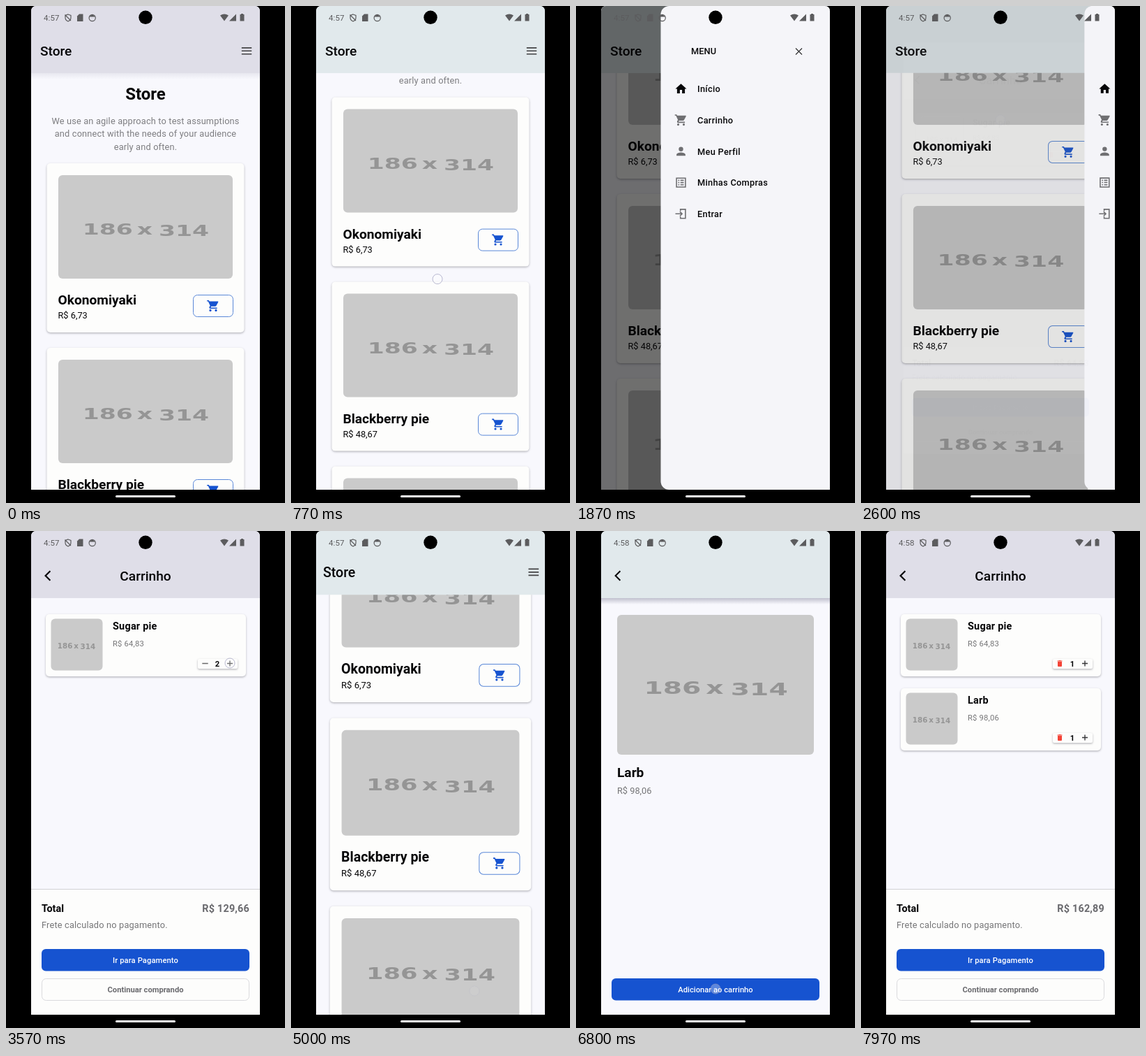
An HTML page with a canvas for the animation above (8 s loop, 400 by 711 pixels).

```html
<!DOCTYPE html>
<html lang="pt">
<head>
<meta charset="utf-8">
<style>
  html, body { margin: 0; width: 100%; height: 100%; overflow: hidden; background: #000; }
  canvas { display: block; width: 400px; height: 711px; }
</style>
</head>
<body>
<canvas id="stage" width="400" height="711"></canvas>
<script>
const ctx = document.getElementById('stage').getContext('2d');
const LOOP = 8000;
const INK = '#060608', GRAY = '#757577', BLUE = '#1653d0';
const BODY = '#f8f8fd', CARD = '#fdfdfc', HEADER = '#dfdee8', HEADER_COOL = '#e1e9ec', IMAGE = '#cacaca';

const ITEMS = [['Okonomiyaki', 'R$ 6,73'], ['Blackberry pie', 'R$ 48,67'], ['Larb', 'R$ 98,06'],
  ['Buko pie', 'R$ 31,40'], ['Sugar pie', 'R$ 64,83']];

const ICONS = {
  cart: 'M1 2v2h2l3.6 7.6-1.4 2.4q-.8 3 1.8 3h12v-2H7.4l1-2h7.2q1.2 0 1.8-1L21 5.500V4H5.200l-.9-2z' +
    'M5 20a2 2 0 1 0 4 0 2 2 0 1 0-4 0M15 20a2 2 0 1 0 4 0 2 2 0 1 0-4 0',
  home: 'M10 20v-6h4v6h5v-8h3L12 3 2 12h3v8z',
  person: 'M8 8a4 4 0 1 0 8 0 4 4 0 1 0-8 0M12 14c-2.700 0-8 1.300-8 4v2h16v-2c0-2.700-5.300-4-8-4z',
  trash: 'M6 7h12v12q0 2-2 2H8q-2 0-2-2zM19 4h-3.500l-1-1h-5l-1 1H5v2h14z'
};
const LINE_ICONS = {
  list: 'M4 4h16v16H4zM7 8h2M11 8h6M7 12h2M11 12h6M7 16h2M11 16h6',
  enter: 'M11 7V4h9v16h-9v-3M2 12h12M10 8l4 4-4 4',
  plus: 'M12 5v14M5 12h14',
  minus: 'M5 12h14',
  close: 'M6 6l12 12M18 6L6 18',
  back: 'M16 4l-8 8 8 8',
  menu: 'M3 6.500h18M3 12h18M3 17.500h18'
};

const clamp = v => Math.min(1, Math.max(0, v));
const span = (t, start, length) => clamp((t - start) / length);
const smooth = (t, start, length) => { const p = span(t, start, length); return p * p * (3 - 2 * p); };
const easeOut = (t, start, length) => 1 - (1 - span(t, start, length)) ** 3;

function text(str, x, y, size, { weight = 400, color = INK, align = 'left', spacing = 0 } = {}) {
  ctx.font = `${weight} ${size}px Roboto, sans-serif`;
  ctx.letterSpacing = spacing + 'px';
  ctx.textAlign = align;
  ctx.fillStyle = color;
  ctx.fillText(str, x, y);
}

function box(x, y, w, h, r, fill, stroke) {
  ctx.beginPath();
  ctx.roundRect(x, y, w, h, r);
  if (fill) { ctx.fillStyle = fill; ctx.fill(); }
  if (stroke) { ctx.strokeStyle = stroke; ctx.lineWidth = 1; ctx.stroke(); }
}

function shadowBox(...args) {
  ctx.save();
  ctx.shadowColor = 'rgba(70,70,80,.4)';
  ctx.shadowBlur = 3;
  ctx.shadowOffsetY = 1.2;
  box(...args);
  ctx.restore();
}

function icon(name, x, y, scale, color, width = 2) {
  ctx.save();
  ctx.translate(x, y);
  ctx.scale(scale, scale);
  ctx.translate(-12, -12);
  if (ICONS[name]) {
    ctx.fillStyle = color;
    ctx.fill(new Path2D(ICONS[name]));
  } else {
    ctx.strokeStyle = color;
    ctx.lineWidth = width;
    ctx.stroke(new Path2D(LINE_ICONS[name]));
  }
  ctx.restore();
}

// Placeholder picture: its caption is distorted along with the picture.
function placeholder(x, y, w, h, size, stretch) {
  box(x, y, w, h, 6, IMAGE);
  ctx.save();
  ctx.translate(x + w / 2 - 1, y + h / 2 + size * .5);
  ctx.scale(stretch, 1);
  ctx.font = `700 ${size}px "DejaVu Sans", sans-serif`;
  ctx.letterSpacing = '0px';
  ctx.fillStyle = '#959595';
  ctx.textAlign = 'right';
  ctx.fillText('186', -size * .5, 0);
  ctx.textAlign = 'center';
  ctx.fillText('x', 0, 0);
  ctx.textAlign = 'left';
  ctx.fillText('314', size * .58, size * .11);
  ctx.restore();
}

function header(color, depth = 0) {
  const shade = ctx.createLinearGradient(0, 96, 0, 105);
  shade.addColorStop(0, `rgba(90,90,120,${depth})`);
  shade.addColorStop(1, 'rgba(90,90,120,0)');
  box(36, 96, 328, 9, 0, shade);
  box(36, 0, 328, 96, 0, color);
}

function store(scroll) {
  box(36, 0, 328, 692, 0, BODY);
  ctx.save();
  ctx.translate(0, -scroll);
  text('Store', 200, 133.5, 24, { weight: 700, align: 'center' });
  ['We use an agile approach to test assumptions', 'and connect with the needs of your audience',
    'early and often.'].forEach((line, i) =>
    text(line, 200, 168.5 + i * 18.6, 12.77, { color: '#7d7d80', align: 'center', spacing: .17 }));
  ITEMS.forEach(([name, price], i) => {
    const y = 225 + i * 264;
    shadowBox(58.5, y, 283, 242, 5, CARD);
    placeholder(75, y + 17, 250, 148, 22, 1.57);
    text(name, 74.5, y + 202, 19.15, { weight: 700 });
    text(price, 74.5, y + 222, 12.77);
    box(268.5, y + 188.5, 57, 31, 6, null, '#5a88d8');
    icon('cart', 297, y + 204, .8, BLUE);
  });
  ctx.restore();
  header(scroll > 1 ? HEADER_COOL : HEADER, scroll > 1 ? 0 : .1);
  text('Store', 49, 71, 19.15, { weight: 500 });
  icon('menu', 345, 64.3, .8, '#444446');
}

function cart(rows, total) {
  box(36, 0, 328, 692, 0, BODY);
  header(HEADER);
  icon('back', 60, 64, .85, INK, 2.6);
  text('Carrinho', 200, 71, 19.15, { weight: 500, align: 'center' });
  rows.forEach(([name, price, count], i) => {
    const y = 119 + i * 106;
    shadowBox(57, y, 287, 89, 5, CARD);
    placeholder(64.5, y + 6.5, 74, 74, 11, .94);
    text(name, 153, y + 22, 14.4, { weight: 700, spacing: .25 });
    text(price, 153, y + 46, 11.2, { color: GRAY, spacing: .2 });
    shadowBox(275, y + 64, 57, 14, 2, CARD);
    if (count > 1) icon('minus', 285.5, y + 70.5, .6, '#68686a', 2.5);
    else icon('trash', 285, y + 70.5, .5, '#f44336');
    text(count, 303, y + 75, 11.2, { weight: 700, align: 'center' });
    icon('plus', 321, y + 70.5, .57, '#363638', 2.4);
  });
  box(36, 512, 328, 180, 0, CARD);
  box(36, 512, 328, 1, 0, '#d2d2d6');
  text('Total', 51, 545, 14.4, { weight: 700 });
  text(total, 349, 545, 14.4, { weight: 700, color: '#6a6a6e', align: 'right', spacing: .2 });
  text('Frete calculado no pagamento.', 51, 568, 12.77, { color: GRAY, spacing: .18 });
  box(51, 598, 298, 31.5, 6, BLUE);
  text('Ir para Pagamento', 200, 618, 11.2, { weight: 500, color: '#fff', align: 'center', spacing: .1 });
  box(51.5, 640.5, 297, 31, 6, null, '#dadade');
  text('Continuar comprando', 200, 660, 11.2, { weight: 700, color: '#6a6a6e', align: 'center' });
}

function product(t) {
  box(36, 0, 328, 692, 0, BODY);
  header(HEADER_COOL, .35);
  icon('back', 60, 64, .85, INK, 2.4);
  if (t < 6050) {
    const head = Math.max(.1, (t - 5580) / 75);
    const length = .25 + 2 * (1 - Math.cos(Math.max(0, t - 5600) / 220));
    ctx.beginPath();
    ctx.arc(200, 394, 14, head - Math.PI / 2, head - Math.PI / 2 + length);
    ctx.strokeStyle = '#77777a';
    ctx.lineWidth = 3;
    ctx.stroke();
    return;
  }
  placeholder(59, 120, 282, 200, 25, 1.57);
  text('Larb', 59, 352, 19.15, { weight: 700 });
  text('R$ 98,06', 59, 376, 12.77, { color: GRAY });
  box(51, 640, 298, 31.5, 6, BLUE);
  text('Adicionar ao carrinho', 200, 660, 11.2, { weight: 500, color: '#fff', align: 'center' });
}

function drawer(open) {
  if (!open) return;
  box(36, 0, 328, 692, 0, `rgba(0,0,0,${.56 * open})`);
  ctx.save();
  ctx.translate(243 * (1 - open), 0);
  box(121.5, 0, 242.5, 692, [12, 0, 0, 12], '#f5f5f9');
  text('MENU', 165, 69.3, 12.77, { weight: 500, spacing: .1 });
  icon('close', 319.5, 65, .75, '#38383a', 1.7);
  [['home', 'Início'], ['cart', 'Carrinho'], ['person', 'Meu Perfil'], ['list', 'Minhas Compras'], ['enter', 'Entrar']]
    .forEach(([name, label], i) => {
      const y = 118.500 + i * 44.7;
      icon(name, 150.5, y, .8, i ? '#6f6f72' : INK);
      text(label, 174, y + 4.8, 12.77, { weight: 500, spacing: .3 });
    });
  ctx.restore();
}

function zoomed(scale, alpha, draw) {
  ctx.save();
  ctx.globalAlpha = alpha;
  ctx.translate(200, 346);
  ctx.scale(scale, scale);
  ctx.translate(-200, -346);
  draw();
  ctx.restore();
}

// Opens one page over another: both grow while the lower one darkens.
function push(progress, lower, upper) {
  if (progress < 1) {
    zoomed(1 + .054 * progress, 1, lower);
    if (progress > 0) box(36, 0, 328, 692, 0, `rgba(0,0,0,${.58 * progress})`);
  }
  if (progress > 0) zoomed(.85 + .15 * progress, clamp(progress * 2), upper);
}

function pop(progress, lower, upper) {
  zoomed(1 + .1 * (1 - progress), 1, lower);
  if (progress < .5) zoomed(1 - .1 * progress, 1 - progress * 2, upper);
}

function statusBar(t) {
  const gray = '#5c5c5e';
  text(t < 6700 ? '4:57' : '4:58', 54, 21, 11.5, { color: gray, spacing: .1 });
  ctx.strokeStyle = ctx.fillStyle = gray;
  ctx.lineWidth = 1.2;
  ctx.stroke(new Path2D('M89 12l4 1.500v3q0 4-4 5.500-4-1.500-4-5.500v-3zM84.500 12.500l8.500 8.500'));
  ctx.fill(new Path2D('M105 11.500h5.500v10.500h-8.500v-7.500z'));
  ctx.beginPath();
  ctx.arc(123.7, 17, 4.6, 0, 7);
  ctx.stroke();
  ctx.fill(new Path2D('M119.500 15.500a4.600 4.600 0 0 1 8.400 0z'));
  ctx.fill(new Path2D('M307 13.500q6-4 12 0l-6 8zM330 11.500v10h-10zM337 11h3v1h1.500v9.500h-6v-9.500h1.500z'));
  ctx.beginPath();
  ctx.arc(200, 16.300, 9.7, 0, 7);
  ctx.fillStyle = '#000';
  ctx.fill();
}

function touches(t, scroll) {
  const list = [
    [210, 485 - scroll, 480, 1123], [345, 64, 1340, 1440], [200, 163, 2390, 2490], [321, 189, 3480, 3610],
    [285, 189, 3880, 3980], [60, 64, 4650, 4750], [263, 658 - (scroll - 220), 5020, 5310],
    [205, 415, 5370, 5480], [200, 655, 6750, 6860]
  ];
  list.forEach(([x, y, start, end]) => {
    const alpha = Math.min(span(t, start - 30, 60), 1 - span(t, end, 130));
    if (alpha <= 0) return;
    ctx.beginPath();
    ctx.arc(x, y, 7, 0, 7);
    ctx.fillStyle = `rgba(255,255,255,${.3 * alpha})`;
    ctx.strokeStyle = `rgba(150,150,185,${.65 * alpha})`;
    ctx.lineWidth = 1;
    ctx.fill();
    ctx.stroke();
  });
}

function render(t) {
  const scroll = 220 * smooth(t, 480, 643) + 316 * smooth(t, 5020, 350);
  const extra = t >= 3540 && t < 3950;
  const shop = () => store(scroll);
  const firstCart = () => cart([['Sugar pie', 'R$ 64,83', extra ? 2 : 1]], extra ? 'R$ 129,66' : 'R$ 64,83');
  const fullCart = () => cart([['Sugar pie', 'R$ 64,83', 1], ['Larb', 'R$ 98,06', 1]], 'R$ 162,89');
  const detail = () => product(t);

  ctx.fillStyle = '#000';
  ctx.fillRect(0, 0, 400, 711);
  ctx.save();
  ctx.beginPath();
  ctx.roundRect(36, 0, 328, 692, [7, 7, 0, 0]);
  ctx.clip();
  if (t < 4800) {
    push(easeOut(t, 2600, 300), () => {
      shop();
      drawer(easeOut(t, 1440, 260) * (1 - smooth(t, 2470, 180)));
    }, firstCart);
  } else if (t < 5450) pop(smooth(t, 4800, 280), shop, firstCart);
  else if (t < 7050) push(easeOut(t, 5450, 300), shop, detail);
  else push(easeOut(t, 7050, 300), detail, fullCart);
  statusBar(t);
  touches(t, scroll);
  ctx.restore();
  box(157, 700, 86, 3, 1.5, '#f8f8fa');
}

function frame(now) {
  render(now % LOOP);
  requestAnimationFrame(frame);
}
render(0);
requestAnimationFrame(frame);
</script>
</body>
</html>
```
